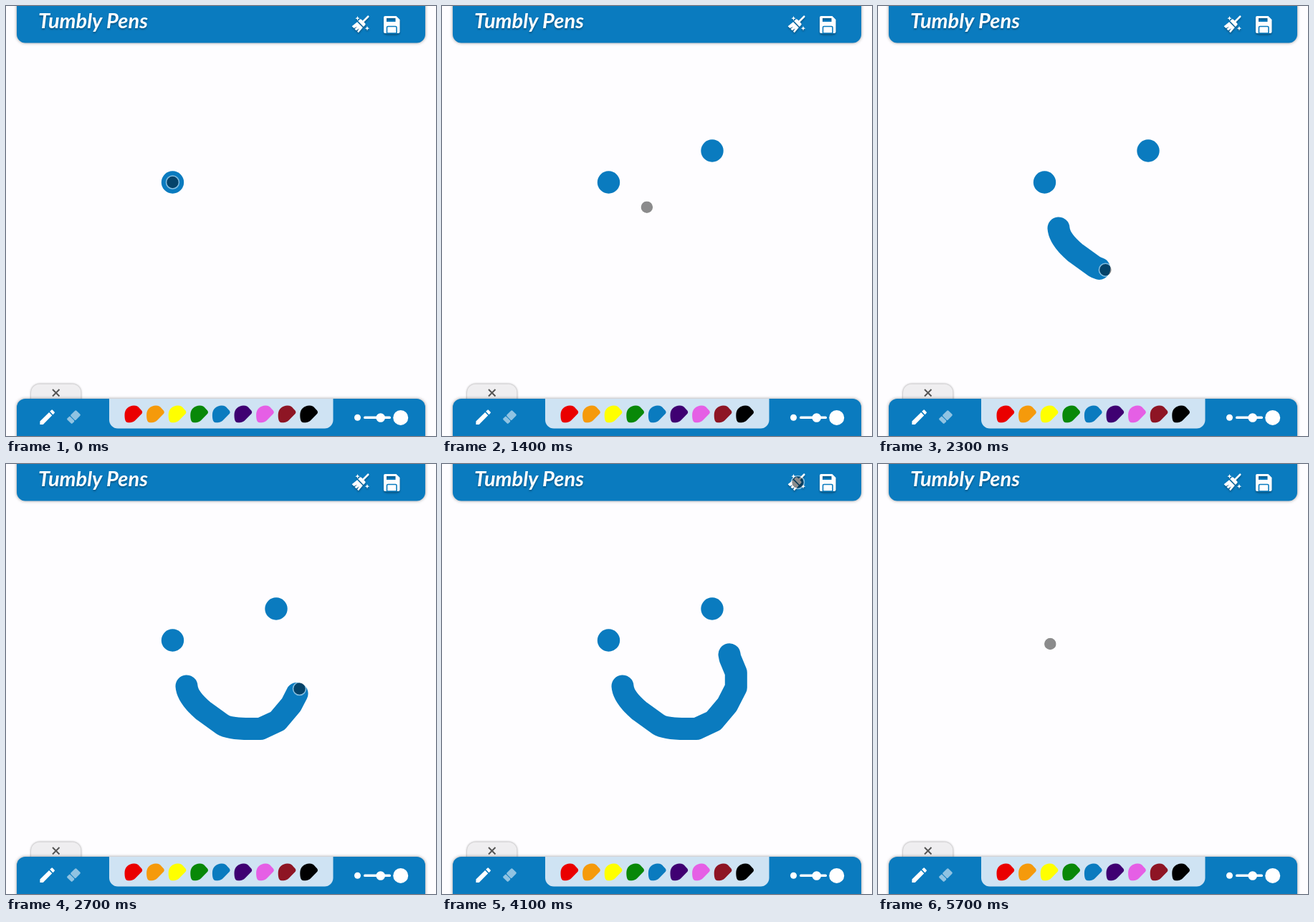
Write an HTML page that moves like this. It is 600 px wide and 600 px high and loops after 6000 ms.

```html
<!DOCTYPE html>
<html lang="en">
<head>
<meta charset="utf-8">
<title>Drawing demo</title>
<style>
  html, body { margin: 0; width: 100%; height: 100%; overflow: hidden; background: #fefdff; }
  svg { display: block; width: 100%; height: 100%; }
  .bar { fill: #0a7bbf; filter: drop-shadow(0 0 2px rgba(0, 0, 0, .4)); }
  .lift { filter: drop-shadow(0 2px 1px rgba(0, 0, 0, .3)); }
  .title { font: italic 700 29px Lato, sans-serif; fill: #fff; }
  .tab { fill: #efeef0; filter: drop-shadow(0 0 1.5px rgba(0, 0, 0, .45)); }
  .ink { fill: #0a7bbf; }
  #smile { fill: none; stroke: #0a7bbf; stroke-width: 31; stroke-linecap: round; stroke-linejoin: round; }
</style>
</head>
<body>
<svg viewBox="0 0 600 600">
  <rect class="bar" x="15" y="-20" width="570" height="71.5" rx="12"/>
  <text class="title lift" x="45" y="31">Tumbly Pens</text>

  <g class="lift" fill="#fff">
    <g transform="translate(495 25) rotate(45)">
      <path d="M-1.3-14.5a1.3 1.3 0 0 1 2.6 0V-5H3.500a2 2 0 0 1 2 2V0H-5.500V-3a2 2 0 0 1 2-2H-1.300Z"/>
      <path d="M-5.500 1.500H5.500L6.500 11H4L3 6 2 11H-1L-.8 6-2.500 11H-6.500Z"/>
    </g>
    <path id="spark" d="M490.500 14l.9 2.300 2.300.9-2.300.9-.9 2.300-.9-2.300-2.300-.9 2.300-.9Z"/>
    <use href="#spark" x="13.5" y="14"/>
  </g>

  <g class="lift">
    <path fill="#fff" fill-rule="evenodd" d="M529 14h15.500l5 5v17a2 2 0 0 1-2 2H529a2 2 0 0 1-2-2V16a2 2 0 0 1 2-2ZM531 17v5H543.500V17Z"/>
    <path fill="#fff" stroke="#0a7bbf" stroke-width="1.6" d="M531.500 38V30a1.500 1.500 0 0 1 1.500-1.500h10.500a1.500 1.500 0 0 1 1.500 1.500v8Z"/>
  </g>

  <g class="ink">
    <circle class="eye" cx="232.5" cy="246" r="15.7"/>
    <circle class="eye" cx="377" cy="202" r="15.7"/>
  </g>
  <path id="smile" d="M252 310Q253 325 275 344L302 363.500Q312 369.600 340 369.600H355L379 358.500 398 336 410.300 312V291L402 271 401 265.700"/>

  <rect class="tab" x="35" y="527.5" width="69.500" height="40" rx="12"/>
  <path d="M65 535l9.500 9.500m0-9.500l-9.500 9.500" stroke="#555" stroke-width="2" fill="none"/>
  <rect class="bar" x="15" y="548" width="570" height="80" rx="12"/>
  <path fill="#cfe3f3" d="M144 548H456.500V577.500a12 12 0 0 1-12 12H156a12 12 0 0 1-12-12Z"/>
  <g id="swatches"></g>

  <g fill="#fff">
    <path transform="translate(44 560) scale(1.14)" d="M3 17.200V21h3.800L17.800 9.900 14.100 6.200ZM20.700 7a1 1 0 0 0 0-1.400L18.400 3.300a1 1 0 0 0-1.400 0L15.100 5.100 18.900 8.900Z"/>
    <g transform="translate(94.5 573.5) rotate(-45)" opacity=".55">
      <rect x="-9" y="-5" width="6" height="10" rx="1.500"/>
      <rect x="-2" y="-5" width="11" height="10" rx="1.500"/>
    </g>
    <circle cx="490.500" cy="574.300" r="4.500"/>
    <rect x="499" y="572.600" width="38" height="3.500" rx="1.700"/>
    <circle cx="522.700" cy="574.500" r="6.300"/>
    <circle cx="550.700" cy="574.400" r="10.500"/>
  </g>

  <g id="cursor">
    <circle r="8.300" fill="rgba(0, 0, 0, .45)"/>
    <circle r="9" fill="none" stroke="rgba(255, 255, 255, .5)" stroke-width="1.500"/>
  </g>
</svg>
<script>
  const LOOP = 6000, STEP = 100;
  const SECOND_EYE = 800, PEN_DOWN = 1700, CLEAR = 4200, LAG = 30;

  const byId = id => document.getElementById(id);
  const cursor = byId('cursor'), smile = byId('smile');
  const eyes = document.querySelectorAll('.eye');

  const colors = ['#ea0000', '#f59a0b', '#ffff00', '#088808', '#0a7bbf', '#3f0072', '#e55fe5', '#8e1524', '#000'];
  const blob = 'M-12 1C-12-7-6-12 1-12C5-12 7-10.500 9-8L11.800-5C13-3.500 13-2 11.800-.5L3 8.500C0 11.500-3 11.800-7 11.800C-11 11.800-12 7-12 1Z';
  byId('swatches').innerHTML = colors.map((color, i) =>
    `<path d="${blob}" fill="${color}" transform="translate(${177.5 + 30.6 * i} 569.5)"/>`).join('');

  function move(from, to, path) {
    if (typeof path === 'string') {
      const d = path;
      path = document.createElementNS('http://www.w3.org/2000/svg', 'path');
      path.setAttribute('d', d);
    }
    return { from, to, path, size: path.getTotalLength() };
  }

  const stroke = move(1800, 3050, smile);
  const moves = [
    move(0, 700, 'M232.5 246Q310 206 377 202'),
    move(900, 1660, 'M377 202L252 310'),
    stroke,
    move(3300, 4000, 'M401 265.7Q445 150 496.5 25.5'),
    move(4100, 5120, 'M496.5 25.5Q364 115 240.3 251')
  ];

  // Distance covered along a move, eased at both ends
  function travelled({ from, to, size }, t) {
    const k = Math.min(1, Math.max(0, (t - from) / (to - from)));
    return size * k * k * (3 - 2 * k);
  }

  const show = (el, on) => el.setAttribute('visibility', on ? 'visible' : 'hidden');

  function draw(t) {
    const current = moves.filter(m => m.from <= t).pop();
    const { x, y } = current.path.getPointAtLength(travelled(current, t));
    cursor.setAttribute('transform', `translate(${x} ${y})`);
    show(eyes[0], t < CLEAR);
    show(eyes[1], t >= SECOND_EYE && t < CLEAR);
    show(smile, t >= PEN_DOWN && t < CLEAR);
    smile.setAttribute('stroke-dasharray', `${travelled(stroke, t - LAG) + .01} 999`);
  }

  const start = performance.now();
  function tick() {
    const t = (performance.now() - start) % LOOP;
    draw(Math.floor(t / STEP) * STEP);
    requestAnimationFrame(tick);
  }
  tick();
</script>
</body>
</html>
```
